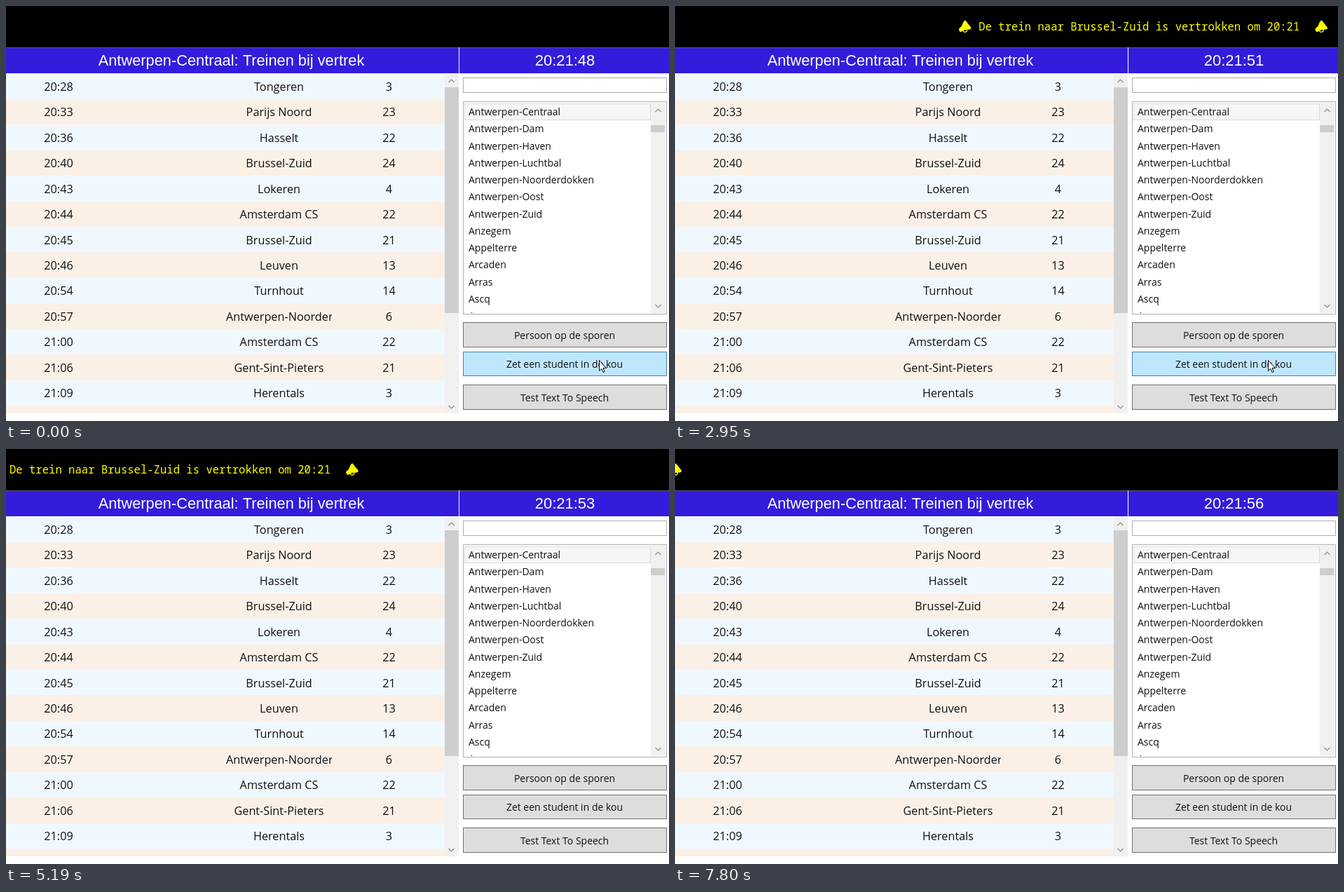
Animation, 946 px wide and 592 px high, one loop 7.86 s. Source, as an HTML page with a canvas:

```html
<!DOCTYPE html>
<html lang="nl">
<head>
<meta charset="utf-8">
<title>Treinen bij vertrek</title>
<style>
html, body { margin: 0; width: 100%; height: 100%; overflow: hidden; background: #fff; }
canvas { display: block; }
</style>
</head>
<body>
<canvas id="stage" width="946" height="592"></canvas>
<script>
const ctx = document.getElementById('stage').getContext('2d');
const LOOP = 7860;
const UI = '"Open Sans", "Noto Sans", sans-serif';
const ROW_FONT = '16.25px ' + UI;
const LIST_FONT = '14px ' + UI;
const HEAD_FONT = '"Liberation Sans", Arial, sans-serif';
const TICKER_FONT = '15.58px "Noto Sans Mono", "DejaVu Sans Mono", monospace';
const MESSAGE = 'De trein naar Brussel-Zuid is vertrokken om 20:21';

const trains = [
  ['20:28', 'Tongeren', '3'], ['20:33', 'Parijs Noord', '23'],
  ['20:36', 'Hasselt', '22'], ['20:40', 'Brussel-Zuid', '24'],
  ['20:43', 'Lokeren', '4'], ['20:44', 'Amsterdam CS', '22'],
  ['20:45', 'Brussel-Zuid', '21'], ['20:46', 'Leuven', '13'],
  ['20:54', 'Turnhout', '14'], ['20:57', 'Antwerpen-Noorderdokken', '6'],
  ['21:00', 'Amsterdam CS', '22'], ['21:06', 'Gent-Sint-Pieters', '21'],
  ['21:09', 'Herentals', '3'], ['', 'Brussel-Nationaal', '']
];
const stations = ['Antwerpen-Centraal', 'Antwerpen-Dam', 'Antwerpen-Haven',
  'Antwerpen-Luchtbal', 'Antwerpen-Noorderdokken', 'Antwerpen-Oost',
  'Antwerpen-Zuid', 'Anzegem', 'Appelterre', 'Arcaden', 'Arras', 'Ascq', 'Asse'];

// The ticker advances in bursts of twelve steps.
const bursts = [130, 960, 1790, 2610, 3410, 4220, 5050, 5890, 6710, 7530, 8350];

function rect(x, y, w, h, fill) {
  ctx.fillStyle = fill;
  ctx.fillRect(x, y, w, h);
}

function box(x, y, w, h, fill, border) {
  rect(x, y, w, h, border);
  rect(x + 1, y + 1, w - 2, h - 2, fill);
}

function text(str, x, y, font, color = '#111', align = 'center') {
  ctx.font = font;
  ctx.fillStyle = color;
  ctx.textAlign = align;
  ctx.fillText(str, x, y);
}

function clipped(x, y, w, h, draw) {
  ctx.save();
  ctx.beginPath();
  ctx.rect(x, y, w, h);
  ctx.clip();
  draw();
  ctx.restore();
}

function chevron(x, y, dir) {
  ctx.beginPath();
  ctx.moveTo(x - 4, y + 2 * dir);
  ctx.lineTo(x, y - 2 * dir);
  ctx.lineTo(x + 4, y + 2 * dir);
  ctx.strokeStyle = '#8c8c8c';
  ctx.lineWidth = 1.2;
  ctx.stroke();
}

function polygon(points) {
  ctx.beginPath();
  points.forEach(([x, y]) => ctx.lineTo(x, y));
  ctx.closePath();
}

function horn(x) {
  ctx.save();
  ctx.translate(x, 20);
  polygon([[0, 13.5], [1, 11.5], [4, 9], [6.5, 3], [8, 1], [9.5, 0.5],
    [17.5, 10.5], [17.5, 12.5], [15.5, 13.5], [9, 14], [3, 17], [1.5, 16.5]]);
  ctx.fillStyle = '#ff0';
  ctx.fill();
  ctx.beginPath();
  ctx.moveTo(6, 15);
  ctx.quadraticCurveTo(7, 18, 10, 17);
  ctx.quadraticCurveTo(12.5, 16, 11.5, 13.5);
  ctx.strokeStyle = '#ff0';
  ctx.lineWidth = 1.3;
  ctx.stroke();
  ctx.restore();
}

function ticker(t) {
  rect(0, 0, 946, 59, '#000');
  if (t < bursts[0]) return;
  let b = 0;
  while (t >= bursts[b + 1]) b++;
  const span = bursts[b + 1] - bursts[b];
  const step = Math.min(11, Math.floor((t - bursts[b]) / span * 12 + 0.2));
  const x = 937 - 12.98 * (b * 12 + step);
  horn(x);
  text(MESSAGE, x + 28.5, 35, TICKER_FONT, '#ff0', 'left');
  horn(x + 508.5);
}

function header(t) {
  rect(0, 59, 946, 1, '#5d5a78');
  rect(0, 60, 946, 36, '#331cdb');
  rect(646, 59, 1, 37, '#fff');
  text('Antwerpen-Centraal: Treinen bij vertrek', 321.5, 85, '21.8px ' + HEAD_FONT, '#fff');
  const sec = t < 615 ? 48 : 49 + Math.floor((t - 615) / 1017);
  text('20:21:' + sec, 797.5, 85, '22px ' + HEAD_FONT, '#fff');
}

function board() {
  clipped(0, 96, 626, 485, () => {
    trains.forEach(([time, place, track], i) => {
      const top = Math.round(96.5 + i * 36.42);
      const base = Math.round(121 + i * 36.42);
      rect(0, top, 626, 37, i % 2 ? '#faf0e6' : '#f0f8ff');
      text(time, 75, base, ROW_FONT);
      text(track, 546.5, base, ROW_FONT);
      clipped(314, top, 151, 37, () => {
        const wide = ctx.measureText(place).width > 151;
        text(place, wide ? 314 : 389.5, base, ROW_FONT, '#111', wide ? 'left' : 'center');
      });
    });
  });
  rect(626, 97, 20, 484, '#f0f0f0');
  rect(626, 116, 20, 322, '#cdcdcd');
  chevron(635.5, 107, 1);
  chevron(635.5, 572, -1);
}

function stationList() {
  box(652, 102, 291, 22, '#fff', '#abadb3');
  box(652, 136, 291, 304, '#fff', '#abadb3');
  box(654, 139, 266, 24, '#f6f6f6', '#dadada');
  clipped(654, 138, 266, 300, () => {
    stations.forEach((name, i) =>
      text(name, 660, Math.round(156 + i * 24.27), LIST_FONT, '#111', 'left'));
  });
  rect(920, 138, 21, 300, '#f0f0f0');
  rect(920, 170, 20, 10, '#cdcdcd');
  chevron(930.5, 149, 1);
  chevron(930.5, 428, -1);
}

function button(label, y, h, base, hot) {
  box(652, y, 291, h, hot ? '#bee6fd' : '#dddddd', hot ? '#3c7fb1' : '#707070');
  text(label, 797, base, LIST_FONT);
}

function cursor(x, y) {
  ctx.save();
  ctx.translate(x, y);
  polygon([[0.5, 0.5], [0.5, 15.5], [3.8, 12.4], [6, 17.6], [8.2, 16.6],
    [6, 11.5], [10.5, 11.5]]);
  ctx.fillStyle = '#fff';
  ctx.fill();
  ctx.strokeStyle = '#000';
  ctx.lineWidth = 1;
  ctx.stroke();
  ctx.restore();
}

function draw(t) {
  rect(0, 0, 946, 592, '#fff');
  ticker(t);
  header(t);
  board();
  stationList();
  const move = Math.min(1, Math.max(0, (t - 4720) / 260));
  const y = 505 + 71 * move;
  button('Persoon op de sporen', 451, 36, 475, false);
  button('Zet een student in de kou', 493, 35, 516, y < 528);
  button('Test Text To Speech', 540, 36, 564, false);
  if (t < 5050) cursor(846 + 28 * move, y);
}

const start = performance.now();
function tick() {
  draw((performance.now() - start) % LOOP);
  requestAnimationFrame(tick);
}
tick();
</script>
</body>
</html>
```
